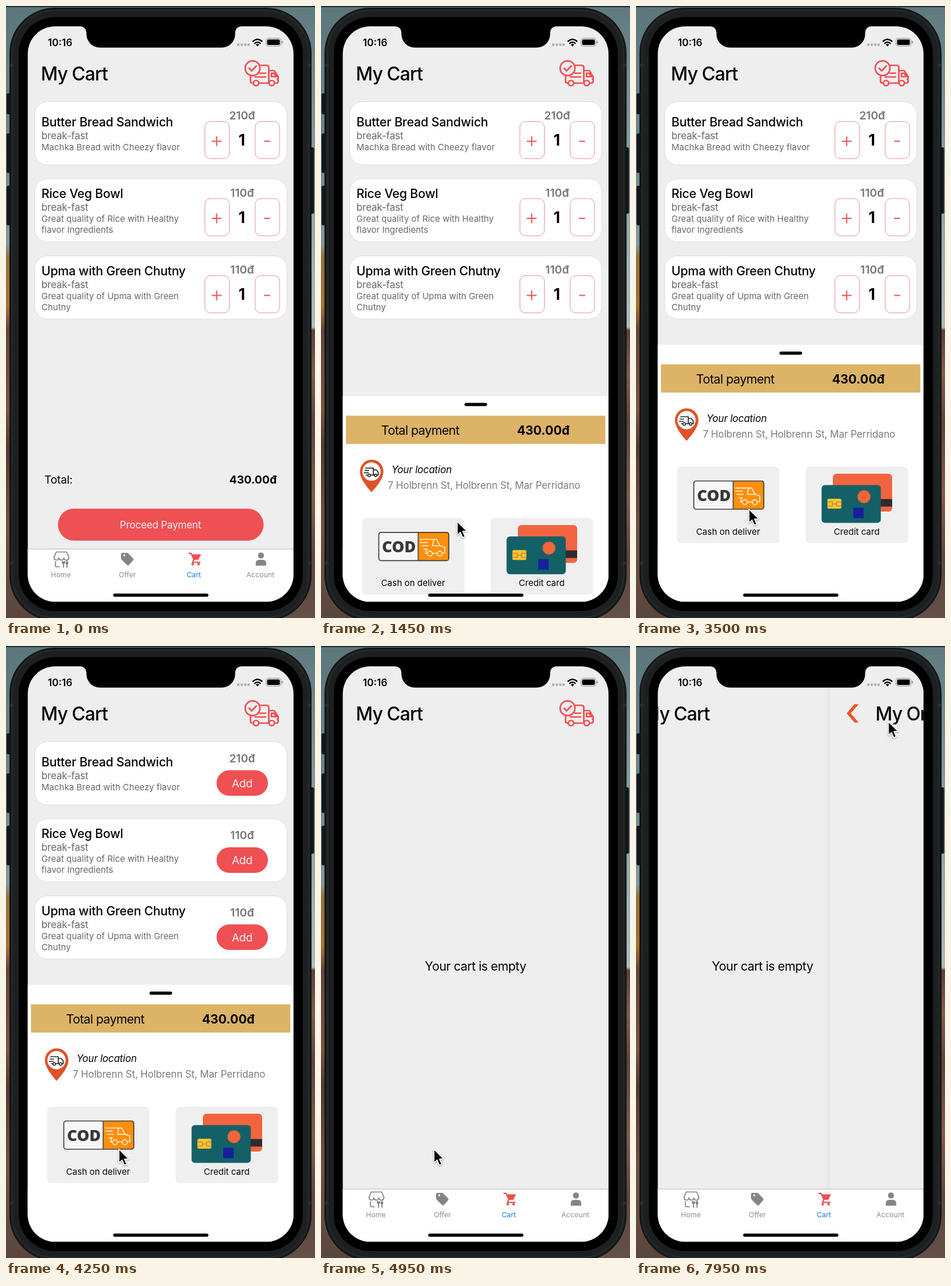
Write an HTML page that moves like this. It is 532 px wide and 1052 px high and loops after 8 s.

```html
<!DOCTYPE html>
<html lang="en">
<head>
<meta charset="utf-8">
<title>Cart checkout</title>
<style>
html, body { margin: 0; width: 100%; height: 100%; overflow: hidden; background: #111; }
svg { display: block; width: 532px; height: 1052px; }
text { font-family: Inter, "Noto Sans", sans-serif; font-optical-sizing: none; white-space: pre; }
.line { fill: none; stroke-linecap: round; stroke-linejoin: round; }
</style>
</head>
<body>
<svg id="stage" viewBox="0 0 532 1052"></svg>
<script>
const RED = '#ee5054', GREY = '#68686a', LOOP = 8000;

// ---- drawing helpers ----
const rect = (x, y, w, h, fill, r = 0, more = '') =>
  `<rect x="${x}" y="${y}" width="${w}" height="${h}" rx="${r}" fill="${fill}" ${more}/>`;
const circle = (x, y, r, fill, more = '') => `<circle cx="${x}" cy="${y}" r="${r}" fill="${fill}" ${more}/>`;
const line = (d, stroke, width) => `<path class="line" d="${d}" stroke="${stroke}" stroke-width="${width}"/>`;
const shape = (d, fill, more = '') => `<path d="${d}" fill="${fill}" ${more}/>`;
const group = (id, body, more = '') => `<g id="${id}" ${more}>${body}</g>`;
const text = (str, x, y, size, { fill = '#050505', weight = 400, gap = 0, anchor = 'start', more = '' } = {}) =>
  `<text x="${x}" y="${y}" font-size="${size}" font-weight="${weight}" fill="${fill}"
    letter-spacing="${gap}" text-anchor="${anchor}" ${more}>${str}</text>`;
const gradient = (id, stops) => `<linearGradient id="${id}" x2="0" y2="1">` +
  stops.map(([at, c]) => `<stop offset="${at}" stop-color="${c}"/>`).join('') + '</linearGradient>';

// ---- phone and surroundings ----
const defs = `<defs>
  ${gradient('leftScene', [[0, '#5c777c'], [.2, '#69848a'], [.39, '#84979a'], [.41, '#94713a'], [.49, '#a9712f'],
    [.53, '#65453a'], [.66, '#7c5444'], [.72, '#563b32'], [.85, '#735145'], [1, '#5a463d']])}
  ${gradient('rightScene', [[0, '#5f7a7f'], [.25, '#869da1'], [.525, '#adbab9'], [.53, '#5a4038'], [.6, '#825b4c'],
    [.68, '#60443a'], [.8, '#7f5c4d'], [.9, '#5e453c'], [1, '#645047']])}
  <linearGradient id="edgeShade"><stop stop-color="#000" stop-opacity="0"/>
    <stop offset="1" stop-color="#000" stop-opacity=".04"/></linearGradient>
  <clipPath id="screen">${rect(37.5, 35, 457.5, 989, '#000', 47)}</clipPath>
</defs>`;

const body = () =>
  rect(0, 0, 266, 1052, 'url(#leftScene)') + rect(266, 0, 266, 1052, 'url(#rightScene)') +
  rect(0, 0, 532, 2, '#20292b') +
  [[150, 36], [219, 68], [309, 68]].map(([y, h]) => rect(1, y, 10, h, '#15181a', 2.5)).join('') +
  rect(520, 243, 10.5, 114, '#15181a', 2.5) +
  rect(7, 4, 518, 1052, '#1d2021', 77, 'stroke="#101213" stroke-width="2"') +
  rect(11, 8, 510, 1043, 'none', 73, 'stroke="#2a2d2e" stroke-width="1.5"') +
  [[7, 99], [519, 99], [7, 955], [519, 955]].map(([x, y]) => rect(x, y, 6, 6, '#2a2c2d')).join('') +
  rect(22, 19, 489, 1021, '#000', 62);

const notch = shape('M128 34 h277 v1 a10.500 10.500 0 0 0 -10.500 10.500 v3 a23 23 0 0 1 -23 23 h-210 a23 23 0 0 1 -23 -23 v-3 a10.500 10.500 0 0 0 -10.500 -10.500z', '#000');

const statusBar =
  text('10:16', 72, 69, 17.2, { weight: 600 }) +
  [398, 404, 410, 415.500].map(x => rect(x, 64.500, 4, 4, '#acacac', 1)).join('') +
  line('M425.500 60.500 q7.500 -6.500 15 0 M428.500 64 q4.500 -3.500 9 0', '#000', 2.6) +
  shape('M433 69.500 l-3 -3.200 q3 -2 6 0z', '#000') +
  rect(447.500, 55.500, 26, 13.500, 'none', 4, 'stroke="#8c8c8c"') +
  rect(449.500, 57.500, 22, 9.500, '#000', 2.2) + rect(475, 60, 1.700, 4.500, '#8c8c8c', 1);

// ---- cart page ----
const deliveryIcon = line(
  'M437.500 102 h11 q4 0 4 4 v25.500 M421 121.500 v8 q0 3 4 3 M436 132.500 h16 M462.500 132.500 h3 q3 0 3 -3 v-8 l-6 -9.500 q-1 -1 -2 -1 h-8' +
  'M457 115.500 h4.500 l4 6 h-8.500z M467 125.500 h1 M437 115.500 h10 M429 122 h18 M418.500 107 l4.500 4.500 l8 -8.500', RED, 2.7) +
  [[424.500, 107, 12.700], [430.500, 132.500, 4.500], [457.500, 132.500, 4.500]]
    .map(c => circle(...c, 'none', `stroke="${RED}" stroke-width="2.7"`)).join('');

const header = str => text(str, 60, 128, 32, { weight: 500, gap: -1 });

const items = [
  ['Butter Bread Sandwich', 210, ['Machka Bread with Cheezy flavor']],
  ['Rice Veg Bowl', 110, ['Great quality of Rice with Healthy', 'flavor Ingredients']],
  ['Upma with Green Chutny', 110, ['Great quality of Upma with Green', 'Chutny']],
];

function itemCard([name, price, about], i) {
  const top = 164.5 + i * 132.500;
  const base = about.length > 1 ? 33 : 42.500;
  const cost = y => text(price + 'đ', 406.500, y, 19.2, { weight: 600, fill: '#767678', anchor: 'middle' });
  const key = x => rect(x, 34, 42, 64, '#fff', 9.5, 'stroke="#e79092"');
  const stepper = cost(30.500) + key(342.500) + key(429) +
    line('M355 68 h15.500 M362.700 60.200 v15.500 M445 68 h9', RED, 2) +
    text('1', 406, 75.500, 26.8, { weight: 700, anchor: 'middle' });
  const add = cost(35) + rect(362.500, 49, 88.500, 44, RED, 22) +
    text('Add', 406.500, 78, 19, { fill: '#fff1f1', anchor: 'middle', gap: -.3 });
  return `<g transform="translate(0 ${top})">` +
    rect(49.500, 0, 434, 108.500, '#fff', 22, 'stroke="#dedede"') +
    text(name, 61, base, 21.2, { weight: 500, gap: -.24 }) +
    text('break-fast', 61, base + 22, 17, { fill: GREY, gap: -.2 }) +
    about.map((row, n) => text(row, 61, base + 41 + n * 19, 15, { fill: GREY })).join('') +
    `<g class="stepper">${stepper}</g><g class="add">${add}</g></g>`;
}

const cartPage = header('My Cart') + deliveryIcon +
  group('filled', items.map(itemCard).join('') +
    text('Total:', 66, 821, 19.2, { gap: -.2 }) +
    text('430.00đ', 466, 821, 19.2, { weight: 700, anchor: 'end' }) +
    rect(89.500, 864, 354, 55, RED, 27.5) +
    text('Proceed Payment', 266, 898, 17.1, { fill: '#fff0f0', anchor: 'middle', gap: -.2 })) +
  group('empty', text('Your cart is empty', 266, 558, 21.3, { anchor: 'middle', gap: -.52 }));

const ordersPage = rect(28, 35, 9.500, 900, 'url(#edgeShade)') + rect(37.500, 35, 457.500, 900, '#eee') +
  shape('M80 100 h7 l-13.500 15.700 l13.500 15.700 h-7 l-13.500 -15.700z', '#f1521f') +
  text('My Orders', 116, 128, 32, { weight: 500, gap: -1 });

// ---- tab bar ----
const tabLabel = (str, x, fill = '#8b8b8d') => text(str, x, 981.500, 12.1, { fill, anchor: 'middle', gap: .1 });
const tabs = rect(37, 933, 459, 92, '#fff') + rect(37, 933, 459, 1, '#b9b9ba') +
  line('M86.500 938.500 h18 l4 9.500 q-1 5 -4.500 4.500 q-4 0 -4.200 -4 q-1 4 -4.300 4 q-3.500 0 -4.300 -4 q-.5 4 -4.300 4 q-3.500 0 -4.400 -4.500z' +
    'M85 955 v6.500 q0 2.500 3 2.500 h4 M97 954.500 v3 q2 2 4 0 v-3 M99 955 v10 M105 954.500 q-3 4 0 5 q3 -1 0 -5 v10.500', '#7f7f81', 1.7) +
  shape('M200.500 940 h7.500 q1.500 0 2.500 1 l8.500 8.700 q1.300 1.500 0 3 l-7.500 8.200 q-1.500 1.400 -3 0 l-9.500 -9.400 q-1 -1 -1 -2.500 v-6.500 q0 -2.500 2.500 -2.500z' +
    'M203.500 942.500 a1.700 1.700 0 1 0 .1 0z', '#858587', 'fill-rule="evenodd"') +
  line('M315 940.800 h3.500 l5 10.500 l-2.500 5 h13', RED, 2.2) + shape('M319 942.500 h17 l-4.500 8.500 q-.5 1 -2 1 h-7z', RED) +
  circle(321.500, 959.500, 2.2, RED) + circle(331.500, 959.500, 2.2, RED) +
  circle(439, 944.500, 5.2, '#858587') + shape('M430 962 v-4 q0 -6 6 -6 h6 q6 0 6 6 v4z', '#858587') +
  tabLabel('Home', 94.500) + tabLabel('Offer', 209) + tabLabel('Cart', 323.500, '#1278e0') + tabLabel('Account', 438);

// ---- payment sheet ----
const option = (x, label) => rect(x, 209.500, 176.500, 131.500, '#efefef', 8) +
  text(label, x + 88, 326, 15, { anchor: 'middle' });

const cashIcon = rect(99.500, 234, 120.500, 48.500, '#f6f6f6', 4) +
  shape('M167.500 234 h48.500 q4 0 4 4 v40.500 q0 4 -4 4 h-48.500z', '#ff8f0b') +
  rect(99.500, 234, 120.500, 48.500, 'none', 4, 'stroke="#3d3d3f" stroke-width="1.7"') + rect(166.500, 234, 1.5, 48.500, '#3d3d3f') +
  text('COD', 105, 268.500, 27, { weight: 800, fill: '#38383a', more: 'style="font-family:\'Open Sans\',sans-serif"' }) +
  line('M171 246 h28 l6 11 l8 2.500 v10 h-3 M171 251.500 h12 M174 257 h11 M177 263 h6 M194 246 l-2 11 h13 M199 270 h-7 M183 270 h-3 l2 -7', '#fff4e2', 1.6) +
  circle(187.500, 270.500, 4.2, 'none', 'stroke="#fff4e2" stroke-width="1.6"') +
  circle(204.500, 270.500, 4.2, 'none', 'stroke="#fff4e2" stroke-width="1.6"');

const cardIcon = rect(339, 221.500, 102, 65, '#f2643f', 6) + rect(400, 265, 41, 13, '#302b2d') +
  rect(319.500, 241, 102, 65, '#146067', 6) + rect(329.500, 264.500, 24, 17, '#fdc434', 2.5) +
  line('M330 270 h8 v7 h-8 M353 270 h-8 v7 h8 M338 273.500 h7', '#a8791e', 1.1) +
  circle(392.500, 261, 11, '#f4653a') + rect(374, 280, 18, 18, '#14219b');

const pin = shape('M87 165 q-20 -22 -20 -35.500 a20 20.300 0 1 1 40.500 0 q0 13.500 -20.500 35.500z', '#df5227') +
  circle(87, 129.500, 15.700, '#fff') +
  line('M77 123.500 h13 v12 M90 126.500 h5 l3.500 4 v5 h-2 M76 127.500 h6 M74.500 131.500 h7 M78 135.500 h2 M86 135.500 h5', '#232426', 1.7) +
  circle(83, 136, 2.2, '#fff', 'stroke="#232426" stroke-width="1.6"') +
  circle(94, 136, 2.2, '#fff', 'stroke="#232426" stroke-width="1.6"');

const sheet = rect(37, 0, 459, 1000, '#fff') + rect(247, 11.500, 39, 5.500, '#000', 2.75) +
  rect(43, 33.500, 446.500, 48.500, '#dcb367') +
  text('Total payment', 103.500, 66.500, 21.3, { gap: -.6 }) +
  text('430.00đ', 428, 66.500, 21.3, { weight: 700, anchor: 'end' }) +
  pin + text('Your location', 121.500, 132.500, 17, { gap: -.2, more: 'font-style="italic"' }) +
  text('7 Holbrenn St, Holbrenn St, Mar Perridano', 115, 159.500, 17, { fill: '#7c7c7e', gap: -.15 }) +
  option(70.500, 'Cash on deliver') + option(292, 'Credit card') + cashIcon + cardIcon;

// ---- alert, centred on its own origin ----
const middle = { anchor: 'middle' };
const alertBox = rect(-149, -77, 298, 154, 'rgba(243,243,243,.94)', 14) +
  text('Order submitted', 0, -38.500, 18.2, { ...middle, weight: 600 }) +
  text('Our warehouse will be started', 0, -15, 13.9, middle) +
  text('preparing your items', 0, 2.500, 13.9, middle) +
  rect(-149, 28.500, 298, 1, '#c4c4c6') +
  text('OK', 0, 60, 18.2, { ...middle, fill: '#1478e6', gap: -.3 });

const cursor = shape('M0 0 v23.500 l5.300 -4.900 l3.900 9 l4.300 -1.900 l-3.900 -8.800 h7.400z', '#000',
  'stroke="#fff" stroke-width="1.6" stroke-linejoin="round" style="filter:drop-shadow(0 1px 1px #0006)"');

const stage = document.getElementById('stage');
stage.innerHTML = defs + body() +
  `<g clip-path="url(#screen)">${rect(37, 35, 459, 990, '#eee')}` +
  group('cart', cartPage) + group('orders', ordersPage) + tabs + group('sheet', sheet) +
  rect(37, 35, 459, 990, '#000', 0, 'id="dim"') + group('alert', alertBox) + '</g>' +
  notch + statusBar + rect(184.500, 1010, 164, 5.500, '#000', 2.75) + group('cursor', cursor);

// ---- motion ----
const $ = id => document.getElementById(id);
const show = (el, on) => el.setAttribute('display', on ? 'inline' : 'none');
const move = (el, x, y, scale = 1) => el.setAttribute('transform', `translate(${x} ${y}) scale(${scale})`);
const steppers = [...document.querySelectorAll('.stepper')];
const adds = [...document.querySelectorAll('.add')];

// Critically damped spring: progress from 0 to 1 after t ms.
const spring = (t, rate = 18) => {
  const u = Math.max(0, t) * rate / 1000;
  return 1 - (1 + u) * Math.exp(-u);
};

// Cursor path: [time, x, y], eased between the points.
const path = [[200, 545, 800], [1050, 234.500, 886], [1850, 234.500, 886], [2350, 194.500, 865],
  [6300, 194.500, 865], [6500, 267, 674], [6850, 267, 674], [7550, 434.500, 130], [LOOP, 434.500, 130]];
function cursorAt(t) {
  const n = path.findIndex(p => p[0] > t);
  if (n < 1) return path[0].slice(1);
  const [t0, x0, y0] = path[n - 1], [t1, x1, y1] = path[n];
  const u = (t - t0) / (t1 - t0), e = u * u * (3 - 2 * u);
  return [x0 + (x1 - x0) * e, y0 + (y1 - y0) * e];
}

function render(t) {
  const leaving = spring(t - 4500);
  const drop = 989 * (1 - spring(t - 1227) + leaving);
  show($('sheet'), t > 1227 && t < 4950);
  move($('sheet'), 0, 582.500 + drop);

  const cleared = t >= 4200, empty = t >= 4550;
  steppers.forEach(el => show(el, !cleared));
  adds.forEach(el => show(el, cleared));
  show($('filled'), !empty);
  show($('empty'), empty);

  const popped = spring(t - 4265, 25);
  const alerting = t > 4265 && t < 4950;
  show($('alert'), alerting);
  show($('dim'), alerting);
  $('dim').setAttribute('opacity', .22 * popped * (1 - leaving));
  $('alert').setAttribute('opacity', popped);
  move($('alert'), 266.500, 537.500 + 989 * leaving, 1.2 - .2 * popped);

  const push = spring(t - 7882);
  show($('orders'), push > 0);
  move($('orders'), 457.500 * (1 - push), 0);
  move($('cart'), -137 * push, 0);

  move($('cursor'), ...cursorAt(t));
}

function tick() {
  render(performance.now() % LOOP);
  requestAnimationFrame(tick);
}
tick();
</script>
</body>
</html>
```
